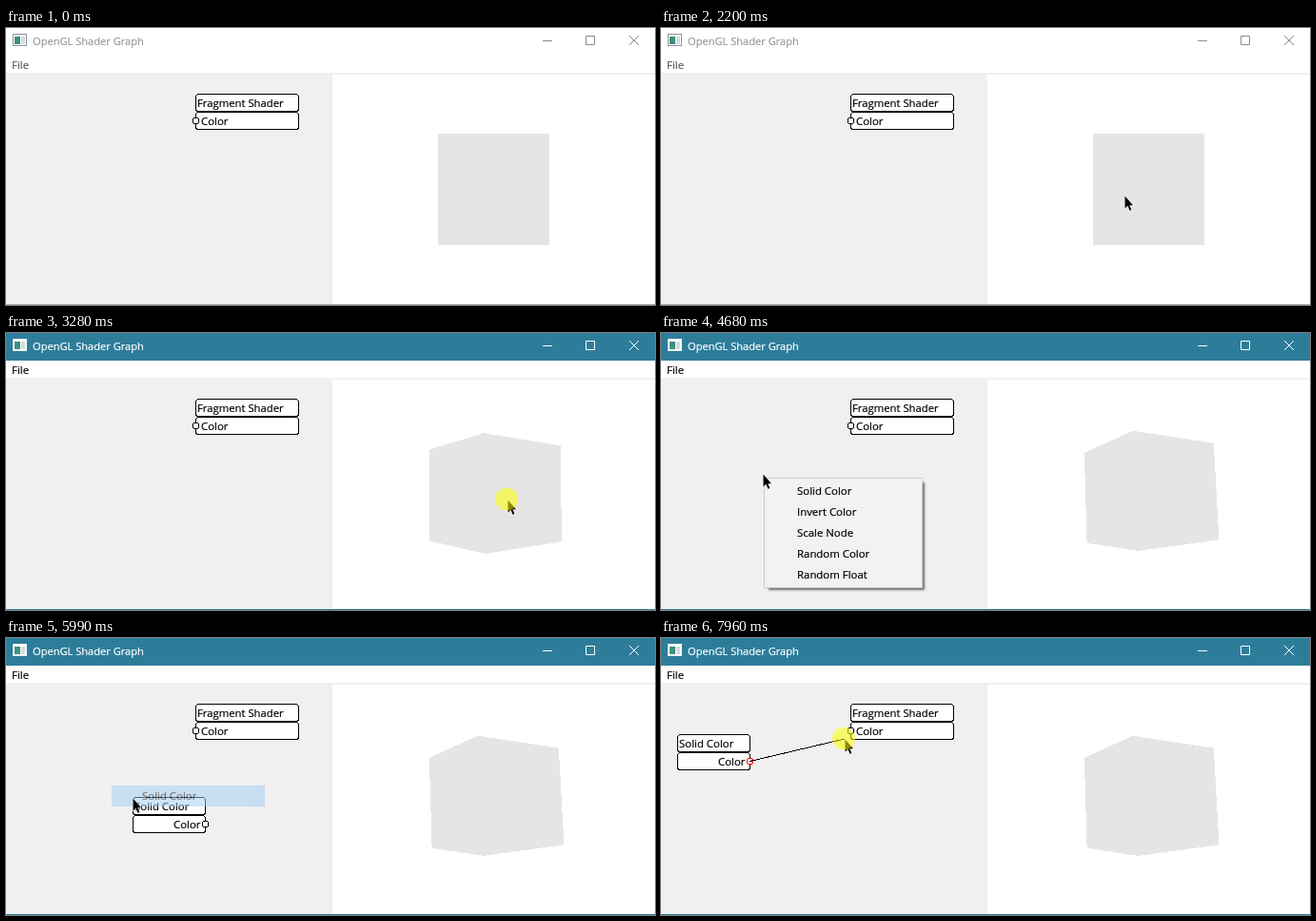
Recreate the animation shown at these times as an HTML page. Size 682 px wide and 291 px high, loop 8000 ms.

```html
<!DOCTYPE html>
<html lang="en">
<head>
<meta charset="utf-8">
<title>Shader graph editor</title>
<style>
  html, body { margin: 0; width: 100%; height: 100%; overflow: hidden; background: #fff; }
  svg { display: block; width: 682px; height: 291px; }
  text {
    font: 11.4px "Open Sans", "Noto Sans", sans-serif; white-space: pre;
    fill: currentColor; stroke: currentColor; stroke-width: .2px;
  }
  .node rect, .port { fill: #fff; stroke: #000; shape-rendering: crispEdges; }
  .shadow { filter: blur(1px); }
</style>
</head>
<body>
<svg viewBox="0 0 682 291">
  <rect width="682" height="291" fill="#fff"/>
  <rect id="titlebar" width="682" height="29"/>
  <g>
    <rect id="icon" x="7.5" y="6.5" width="14" height="12" fill="#fff"/>
    <rect x="9" y="9" width="6" height="8" fill="#3f8f83"/>
    <rect x="16" y="9" width="4" height="8" fill="#d5dcdd"/>
  </g>
  <text id="title" x="28" y="18" style="font-size:11.1px">OpenGL Shader Graph</text>
  <path id="buttons" d="M564 13.5h10M609.5 8.5h9v9h-9zM655 8l10 10M665 8l-10 10" fill="none"/>
  <text id="file" x="6" y="43">File</text>
  <path d="M0 47H682V49H343V290H0Z" fill="#f0f0f0"/>
  <rect id="bottom" y="290" width="682" height="1"/>
  <path id="cube" fill="#e5e5e5" shape-rendering="crispEdges"/>

  <g class="node" transform="translate(199.5 69.5)">
    <rect width="108" height="18" rx="3"/>
    <rect y="19" width="108" height="18" rx="3"/>
    <text x="1.5" y="13.5" style="font-size:11.3px">Fragment Shader</text>
    <text x="5.5" y="32.5">Color</text>
    <circle class="port" cy="28" r="3.2"/>
  </g>

  <g id="solid" class="node">
    <rect width="76" height="18" rx="3"/>
    <rect y="19" width="76" height="18" rx="3"/>
    <text x="1.5" y="13.5">Solid Color</text>
    <text x="71" y="32.5" text-anchor="end">Color</text>
    <circle id="output" class="port" cx="76" cy="28" r="3.2"/>
  </g>
  <path id="wire" stroke="#000" shape-rendering="crispEdges"/>

  <g id="menu">
    <rect class="shadow" x="113" y="157" width="164" height="113" fill="#0008"/>
    <rect x="108.5" y="152.5" width="166" height="115" fill="#f2f2f2" stroke="#ccc"/>
    <rect id="hover" x="111" y="155" width="161" height="22" fill="#90c8f6"/>
  </g>
  <g id="ghost">
    <rect x="111" y="155" width="161" height="22" fill="#9fcdf6"/>
    <text x="143" y="170">Solid Color</text>
  </g>

  <path id="cursor" d="M.5 .5V13.5L3.4 10.8L5.4 15.8L7.4 15L5.4 10.3H9Z"
        stroke="#fff" paint-order="stroke"/>
  <circle id="press" r="12" fill="#ff0" opacity=".55"/>
</svg>
<script>
const LOOP = 8000;
const TICK = 77;
const el = id => document.getElementById(id);
const set = (id, attrs) => {
  for (const name in attrs) el(id).setAttribute(name, attrs[name]);
};
const show = (id, on) => set(id, { display: on ? "inline" : "none" });
const within = (t, from, to) => t >= from && t < to;
const clamp = (v, low, high) => Math.min(Math.max(v, low), high);

["Solid Color", "Invert Color", "Scale Node", "Random Color", "Random Float"].forEach((label, i) => {
  const item = document.createElementNS("http://www.w3.org/2000/svg", "text");
  set("menu", {});
  item.setAttribute("x", 143);
  item.setAttribute("y", 170 + 22 * i);
  item.textContent = label;
  el("menu").append(item);
});

// Pointer moves: start, end, and where each one arrives.
const entry = [600, 288];
const moves = [
  [350, 1120, 129, 157], [1200, 1510, 115, 168], [1660, 2200, 487, 176],
  [2500, 2890, 533, 188], [2970, 3280, 527, 175], [3430, 3510, 524, 172],
  [3590, 3980, 108, 152], [4680, 4830, 105, 138], [5000, 5460, 133, 168],
  [6070, 6230, 152, 179], [6310, 6780, 36, 114], [6950, 6950, 36, 113],
  [7030, 7250, 93, 131], [7650, 7960, 193, 106]
];
const drag = { cube: [2430, 3510], node: [6300, 6950], wire: [7650, LOOP] };
const clicks = [[4050, 4140], [5760, 5910]];
const presses = [...Object.values(drag), ...clicks];

// Eased position, advanced one screen update at a time.
function pointerAt(t) {
  let [x, y] = entry;
  for (const [start, end, toX, toY] of moves) {
    if (t < start) break;
    const count = Math.round((end - start) / TICK) + 1;
    const step = (end - start) / (count - 1) || TICK;
    const k = Math.min(1, (Math.floor((t - start) / step + 1e-6) + 1) / count);
    const ease = k * k * (3 - 2 * k);
    x += (toX - x) * ease;
    y += (toY - y) * ease;
  }
  return [Math.round(x), Math.round(y)];
}

const dragPoint = (t, [from, to]) => pointerAt(clamp(t, from, to));

function hull(points) {
  points.sort((a, b) => a[0] - b[0] || a[1] - b[1]);
  const half = list => {
    const out = [];
    for (const p of list) {
      while (out.length > 1) {
        const [a, b] = out.slice(-2);
        if ((b[0] - a[0]) * (p[1] - a[1]) - (b[1] - a[1]) * (p[0] - a[0]) > 0) break;
        out.pop();
      }
      out.push(p);
    }
    return out.slice(0, -1);
  };
  return [...half(points), ...half([...points].reverse())];
}

// Pitch about the cube's own axis, then yaw, then perspective.
function cubeOutline(yaw, pitch) {
  const rad = Math.PI / 180;
  const cy = Math.cos(yaw * rad), sy = Math.sin(yaw * rad);
  const cp = Math.cos(pitch * rad), sp = Math.sin(pitch * rad);
  const points = [];
  for (const x of [-1, 1]) for (const y of [-1, 1]) for (const z of [-1, 1]) {
    const y1 = y * cp - z * sp, z1 = y * sp + z * cp;
    const scale = 307.7 / (6.26 + x * sy - z1 * cy);
    points.push([512.5 + (x * cy + z1 * sy) * scale, 169.5 - y1 * scale]);
  }
  return "M" + hull(points).map(p => p.map(v => v.toFixed(2)).join()).join("L") + "Z";
}

function render(now) {
  const t = now % LOOP;
  const active = t >= drag.cube[0];
  const [x, y] = pointerAt(t);

  set("titlebar", { fill: active ? "#2d7d9a" : "#fff" });
  set("icon", { stroke: active ? "#e8eef0" : "#8b9396" });
  set("title", { color: active ? "#fff" : "#999" });
  set("file", { color: active ? "#000" : "#555" });
  set("buttons", { stroke: active ? "#fff" : "#8c8c8c" });
  set("bottom", { fill: active ? "#2d7d9a" : "#aaa" });

  // One degree of rotation per dragged pixel.
  const [grabX, grabY] = pointerAt(drag.cube[0]);
  const [cubeX, cubeY] = dragPoint(t, drag.cube);
  set("cube", { d: cubeOutline(cubeX - grabX - 1, cubeY - grabY) });
  if (!active) set("cube", { d: cubeOutline(0, 0) });

  const [menuShown, menuClosed] = [clicks[0][1], clicks[1][1]];
  show("menu", within(t, menuShown, menuClosed));
  show("hover", x > 111 && y > 154);
  show("ghost", within(t, menuClosed, menuClosed + 2 * TICK));
  set("ghost", { opacity: t < menuClosed + TICK ? 0.75 : 0.5 });

  const [heldX, heldY] = dragPoint(t, drag.node);
  const nodeX = heldX - 18.5, nodeY = heldY - 11.5;
  const wiring = t >= drag.wire[0];
  show("solid", t >= menuClosed);
  set("solid", { transform: `translate(${nodeX} ${nodeY})` });
  el("output").style.stroke = wiring ? "#f00" : "#000";
  show("wire", wiring);
  set("wire", { d: `M${nodeX + 76} ${nodeY + 28}L${x} ${y}` });

  show("cursor", t >= moves[0][0]);
  set("cursor", { transform: `translate(${x} ${y})` });
  show("press", presses.some(([from, to]) => within(t, from, to)));
  set("press", { cx: x - 1, cy: y - 0.5 });
}

const origin = performance.now();
function tick() {
  render(performance.now() - origin);
  requestAnimationFrame(tick);
}
tick();
</script>
</body>
</html>
```
